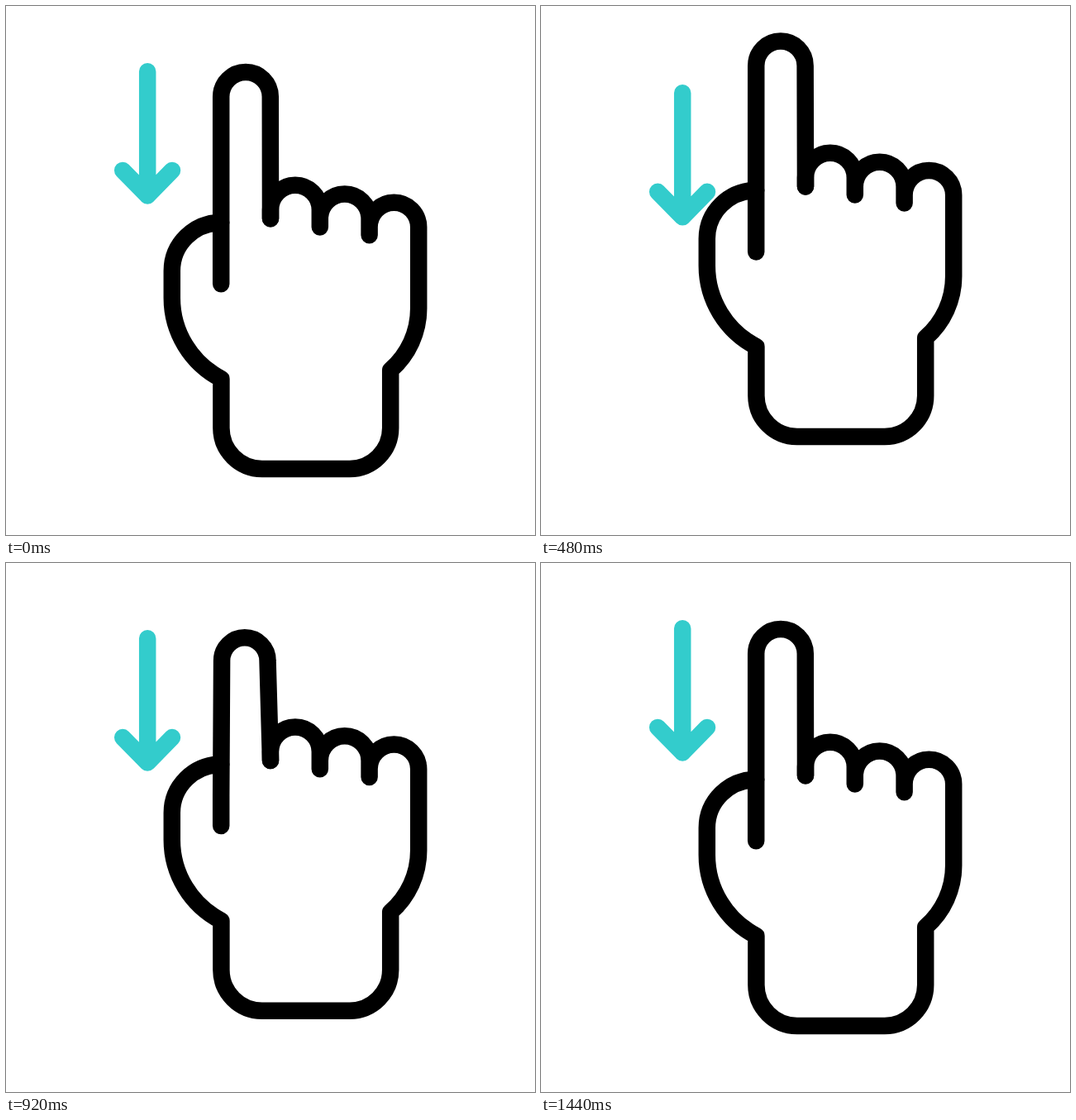
Animation of 640x640 px, one loop 1.48 s. Source, as an HTML page:

```html
<!DOCTYPE html>
<html lang="en">
<head>
<meta charset="utf-8">
<title>Swipe down</title>
<style>
  html, body { margin: 0; width: 100%; height: 100%; overflow: hidden; background: #fff; }
  svg { display: block; width: 100%; height: 100%; }
  path { fill: none; stroke-width: 20.5; stroke-linecap: round; stroke-linejoin: round; }
  #arrow { stroke: #33cccc; }
  #hand { stroke: #000; }
</style>
</head>
<body>
<svg viewBox="0 0 640 640">
  <path id="arrow" d="M171.2 79.2V229.4M141.2 198.9L171.2 229.4L201 198.9"/>
  <g id="hand">
    <path d="M260.2 262A59.4 58.5 0 0 0 200.8 320.5V353A110 110 0 0 0 260.4 451V510.5
             A49.4 49.4 0 0 0 309.8 559.9H415.8A49.4 49.4 0 0 0 465.2 510.5V440.5
             A98.6 98.6 0 0 0 499.2 366V267.6A29.8 29.8 0 0 0 439.6 267.6V277.3
             V257.5A29.85 29.85 0 0 0 379.8 257.5V267.5
             V246.6A29.9 29.9 0 0 0 320 246.6V257.3"/>
    <path id="finger"/>
  </g>
</svg>
<script>
  const LOOP = 1480, STEP = 40, STARTS = [28, 697];
  const arrow = document.getElementById('arrow');
  const hand = document.getElementById('hand');
  const finger = document.getElementById('finger');

  const ease = (t, from, to) => {
    const x = Math.min(1, Math.max(0, (t - from) / (to - from)));
    return x * x * (3 - 2 * x);
  };
  const lift = t => ease(t, 0, 466) - ease(t, 466, 675);
  const bend = t => ease(t, 0, 237) - ease(t, 306, 475);
  const sum = (motion, t) => STARTS.reduce((total, start) => total + motion(t - start), 0);

  function draw(t) {
    const up = sum(lift, t), bent = sum(bend, t);
    const r = 29.8 - 2.1 * bent, x = 290 - 1.2 * bent, y = 109.8 + 26.7 * bent;
    arrow.setAttribute('transform', `translate(0 ${26 * up})`);
    hand.setAttribute('transform', `translate(0 ${-39 * up})`);
    finger.setAttribute('d',
      `M260.2 336.3V300L${x - r} ${y}A${r} ${r} 0 0 1 ${x + r} ${y}L320 257.3`);
  }

  function tick() {
    const t = performance.now() % LOOP;
    draw(Math.floor(t / STEP) * STEP);
    requestAnimationFrame(tick);
  }
  tick();
</script>
</body>
</html>
```
